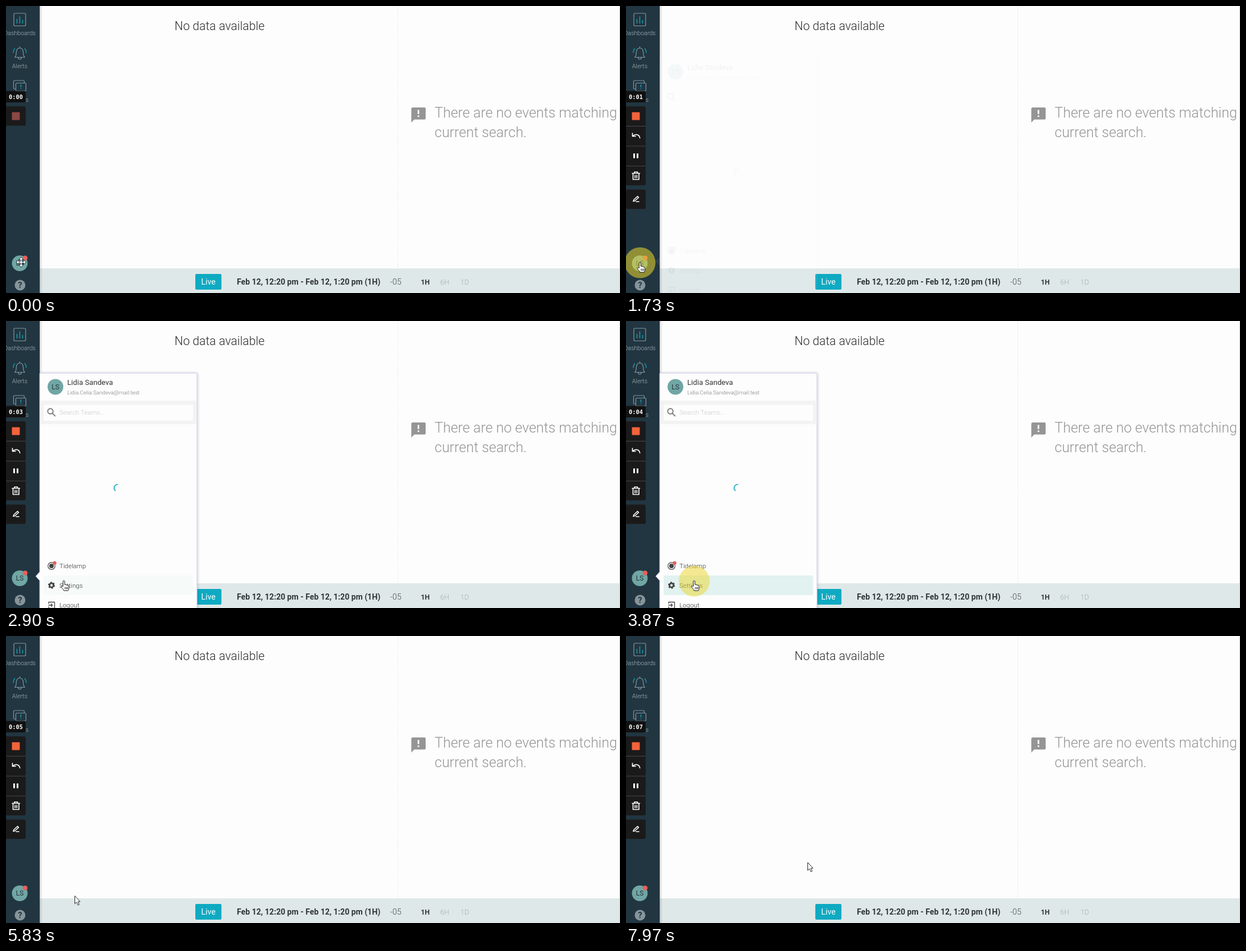
An HTML page that plays this animation: 1093x512 px, repeating every 8000 ms.

```html
<!DOCTYPE html>
<html lang="en">
<head>
<meta charset="utf-8">
<title>Event console</title>
<style>
html, body { margin: 0; width: 100%; height: 100%; overflow: hidden; background: #fdfdfd; }
svg { display: block; }
text { font-family: Roboto, sans-serif; font-weight: 300; }
.mid { text-anchor: middle; }
.reg { font-weight: 400; }
.bold { font-weight: 700; }
.line { fill: none; stroke-linecap: round; stroke-linejoin: round; }
.nav text { font-size: 10.7px; fill: #a9b6bb; text-anchor: middle; }
.nav .line { stroke: #8299a3; stroke-width: 1.2; }
.nav .teal { stroke: #159aa6; stroke-width: 1.6; }
.menu text { font-size: 11.6px; fill: #333; }
.clock text { font: 700 10.4px "DejaVu Sans Mono", monospace; fill: #fff; text-anchor: middle; }

/* One loop is 8 s, so 1% is 80 ms. */
.anim { animation: 8s linear infinite; }
.clock { animation-name: tick; animation-timing-function: step-end; }
.tools { animation-name: tools; }
.stop { animation-name: stop; }
.popup { animation-name: popup; }
.hover { animation-name: hover; }
.pointer { animation-name: travel; }
.glow { animation-name: click; }
.move, .hand, .arrow { animation-timing-function: step-end; }
.move { animation-name: move; }
.hand { animation-name: hand; }
.arrow { animation-name: arrow; }

@keyframes tick {
  0% { transform: translateY(0); }
  8.75% { transform: translateY(-30px); }
  23.4% { transform: translateY(-60px); }
  34.6% { transform: translateY(-90px); }
  47.5% { transform: translateY(-120px); }
  62.5% { transform: translateY(-150px); }
  73.75% { transform: translateY(-180px); }
  86.25%, 100% { transform: translateY(-210px); }
}
@keyframes tools {
  0%, .4% { opacity: 0; }
  4.2%, 100% { opacity: 1; }
}
@keyframes stop {
  0%, .4% { fill: #8c4843; }
  4.2%, 100% { fill: #f2633b; }
}
@keyframes popup {
  0%, 21.5% { opacity: 0; }
  23.75%, 50.6% { opacity: 1; }
  52.5%, 100% { opacity: 0; }
}
@keyframes hover {
  0%, 35.8% { opacity: 0; }
  37.5%, 100% { opacity: 1; }
}
@keyframes travel {
  0%, 33.75% { transform: translate(25px, 458px); animation-timing-function: ease-in; }
  36.25% { transform: translate(103px, 464px); animation-timing-function: ease-out; }
  38.75%, 53.1% { transform: translate(121.5px, 464px); }
  53.2%, 80.375% { transform: translate(122px, 463.5px); animation-timing-function: ease-in; }
  82.875% { transform: translate(140px, 461px); animation-timing-function: cubic-bezier(.35, .3, .65, 1); }
  90.375% { transform: translate(307px, 403.5px); }
  91.25%, 100% { transform: translate(323px, 404px); }
}
@keyframes click {
  0%, 20% { opacity: 0; }
  20.6%, 22% { opacity: .56; }
  25%, 47.2% { opacity: 0; }
  47.8%, 48.8% { opacity: .52; }
  51%, 100% { opacity: 0; }
}
@keyframes move {
  0% { opacity: 1; }
  8.75%, 100% { opacity: 0; }
}
@keyframes hand {
  0% { opacity: 0; }
  8.75% { opacity: 1; }
  34.6% { opacity: 0; }
  35.8% { opacity: 1; }
  52.5%, 100% { opacity: 0; }
}
@keyframes arrow {
  0% { opacity: 0; }
  34.6% { opacity: 1; }
  35.8% { opacity: 0; }
  52.5%, 100% { opacity: 1; }
}
</style>
</head>
<body>
<svg width="1093" height="512" viewBox="0 0 1093 512">
  <defs>
    <linearGradient id="edge">
      <stop offset="0" stop-color="#000" stop-opacity=".16"/>
      <stop offset="1" stop-color="#000" stop-opacity="0"/>
    </linearGradient>
    <filter id="shade" x="-10%" y="-10%" width="120%" height="120%">
      <feDropShadow dx="0" dy="1" stdDeviation="2.5" flood-color="#334" flood-opacity=".3"/>
    </filter>
    <clipPath id="slot"><rect y="152" width="35" height="20"/></clipPath>
    <g id="badge">
      <circle r="14" fill="#70a6a4"/>
      <text class="mid reg" y="4.3" font-size="12" fill="#26363f">LS</text>
    </g>
  </defs>

  <!-- Page -->
  <rect width="1093" height="512" fill="#fdfdfd"/>
  <path d="M697.5 0V468" stroke="#e4e6ee" stroke-dasharray="2 2"/>
  <text x="300" y="43.3" font-size="21.3" fill="#2d2d2d">No data available</text>
  <path d="M724 181h21q2 0 2 2v17.500q0 2-2 2h-18.500L721.500 208V183.500q0-2.500 2.500-2.500z" fill="#959595"/>
  <path d="M734.200 185.500v7.200M734.200 195.300v2.800" stroke="#fdfdfd" stroke-width="2.800"/>
  <g font-size="25" fill="#959595">
    <text x="763" y="199.300">There are no events matching</text>
    <text x="763" y="234.300">current search.</text>
  </g>

  <!-- Time bar -->
  <rect x="60" y="468" width="1033" height="44" fill="#dfe8e8"/>
  <rect x="337" y="478" width="46.500" height="28" rx="2" fill="#0faac2"/>
  <text class="mid reg" x="360.300" y="497.300" font-size="14.200" fill="#fff">Live</text>
  <text class="bold" x="411" y="497.200" font-size="14.100" fill="#2f3538">Feb 12, 12:20 pm - Feb 12, 1:20 pm (1H)</text>
  <text x="684" y="497.200" font-size="14.200" fill="#444c50">-05</text>
  <text class="bold" x="738.500" y="496.800" font-size="12.300" fill="#2f3538">1H</text>
  <g class="reg" font-size="12.500" fill="#a3adb0">
    <text x="773" y="496.800">6H</text>
    <text x="809" y="496.800">1D</text>
  </g>
  <path d="M1092.500 0V512" stroke="#cfd3d4"/>

  <!-- Navigation -->
  <rect x="60" width="5" height="512" fill="url(#edge)"/>
  <rect width="60" height="512" fill="#213641"/>
  <g class="nav">
    <rect class="line" x="14" y="13" width="21" height="22.500" rx="2"/>
    <path class="line teal" stroke-width="2" d="M19.500 30.500v-7M24.500 30.500V19M29.500 30.500v-5"/>
    <text x="24.500" y="52">Dashboards</text>
    <path class="line" d="M15.500 91.500c3-2 2.500-5 2.800-9 .4-5 3-7.500 6.200-7.500s5.800 2.500 6.200 7.500c.3 4-.2 7 2.800 9zM24.500 75v-2.500M21.500 92c.5 4 5.500 4 6 0"/>
    <path class="line teal" d="M15.500 76q-2.500 3-2.500 7M33.500 76q2.500 3 2.500 7"/>
    <text x="24.500" y="111.300">Alerts</text>
    <path class="line" d="M17 148h-2q-1.500 0-1.500-1.500v-12q0-1.500 1.500-1.500h16q1.500 0 1.500 1.500v2.500"/>
    <rect class="line" x="17.500" y="137.500" width="18" height="14" rx="1.500"/>
    <path class="line teal" d="M26.500 140.500v4M26.500 147.500v.3"/>
    <text x="24.500" y="171">Events</text>
  </g>
  <use href="#badge" x="24.500" y="459"/>
  <circle cx="34" cy="449.500" r="4.300" fill="#e8605b"/>
  <circle cx="25" cy="498" r="9.500" fill="#87959b"/>
  <text class="mid bold" x="25" y="503.300" font-size="15" fill="#213641">?</text>

  <!-- Account menu -->
  <g class="anim popup menu">
    <path d="M60 93H340V520H60V463L53 455.300 60 447.500z" fill="#fdfdfd" stroke="#c9c8e4" filter="url(#shade)"/>
    <use href="#badge" x="88" y="117.500"/>
    <text class="reg" x="109" y="114" style="font-size:13.200px">Lidia Sandeva</text>
    <text x="109" y="131" style="font-size:9.800px;fill:#777">Lidia.Celia.Sandeva@mail.test</text>
    <rect x="60.500" y="142" width="279" height="42" fill="#f3f3f3"/>
    <rect x="67" y="149.500" width="266" height="28.500" rx="2" fill="#fdfdfd"/>
    <g class="line" stroke="#777" stroke-width="1.900">
      <circle cx="79" cy="161" r="4.700"/>
      <path d="M82.800 164.800l4.500 4.500"/>
    </g>
    <text x="95" y="167" style="fill:#c9c9c9">Search Teams...</text>
    <path class="line" d="M194.500 302.700A6.500 6.500 0 0 1 199 291.500" stroke="#1aa7bd" stroke-width="1.700"/>

    <rect class="anim hover" x="67" y="454" width="266" height="35" fill="#e1f2f0"/>
    <g fill="none" stroke="#444">
      <circle cx="81" cy="437" r="6.300" stroke-width="1.200"/>
      <circle cx="81" cy="437" r="3.200" fill="#444" stroke-width="1.600"/>
      <circle cx="81" cy="471.500" r="3.600" stroke-width="2.800"/>
      <circle cx="81" cy="471.500" r="5.300" stroke-width="1.800" stroke-dasharray="2.775"/>
      <path class="line" d="M76 504v-2.500h10.500v11H76V510M76 507h6.500M80.500 504.800l2.200 2.200-2.200 2.200" stroke-width="1.300"/>
    </g>
    <circle cx="86.500" cy="431.800" r="3.300" fill="#e8605b"/>
    <text x="95" y="440.600">Tidelamp</text>
    <text x="95" y="475.600">Settings</text>
    <text x="95" y="510.600">Logout</text>
  </g>

  <!-- Recorder -->
  <path d="M0 151.500h32q3 0 3 3v14.500q0 3-3 3H0z" fill="#111"/>
  <g clip-path="url(#slot)">
    <g class="anim clock">
      <text x="17.500" y="165.500">0:00</text>
      <text x="17.500" y="195.500">0:01</text>
      <text x="17.500" y="225.500">0:02</text>
      <text x="17.500" y="255.500">0:03</text>
      <text x="17.500" y="285.500">0:04</text>
      <text x="17.500" y="315.500">0:05</text>
      <text x="17.500" y="345.500">0:06</text>
      <text x="17.500" y="375.500">0:07</text>
    </g>
  </g>
  <path d="M0 179h32q3 0 3 3v31.500H0z" fill="#1b1a1b"/>
  <rect class="anim stop" x="10.500" y="189.500" width="14" height="14" rx="1"/>
  <g class="anim tools">
    <path d="M0 213.500h35V317q0 3-3 3H0zM0 327.500h32q3 0 3 3V359q0 3-3 3H0z" fill="#1b1a1b"/>
    <path d="M0 214.500h35M0 250h35M0 285.500h35" stroke="#454548"/>
    <g class="line" stroke="#fff" stroke-width="1.700">
      <path d="M11.500 227v5.500h5.500M12 232q6-4.500 10.500-1 2 1.700 2.200 4.500"/>
      <path d="M14.500 263v8.500M20.500 263v8.500" stroke-width="3" stroke-linecap="butt"/>
      <path d="M11 298.500h13.500M15 298v-2h5.500v2M12.500 299v10.500h10.500V299M16.200 302v4.500M19.300 302v4.500"/>
      <path d="M13 348.500l1-3 6.500-6 2 2-6.500 6zM18 349h5"/>
    </g>
  </g>

  <!-- Pointer -->
  <g class="anim pointer">
    <circle class="anim glow" r="27.500" fill="#ecd62f"/>
    <g class="anim move">
      <path d="M2-10l4 4.500H3.300V-2.300H6.500V-5l4.500 4-4.500 4V.300H3.300V3.500H6L2 8-2 3.500H.700V.300H-2.500V3L-7-1l4.500-4v2.700H.700V-5.500H-2z" fill="#fff" stroke="#1c2a30" stroke-width="1"/>
    </g>
    <path class="anim hand line" d="M-1.700 9V1q0-1.700 1.500-1.700T1.300 1v5.300q2-.9 2.700.7 1.800-.7 2.500.9 2.300-.5 2.300 1.600v2.700q0 2.500-1.500 4.800H-.200q-1-2.500-3-4.300-1.500-1.800-2-3.200 .5-2 2.200-.5zM2 11v3M4.300 11v3M6.500 11v3" style="fill:#fff" stroke="#111" stroke-width="1"/>
    <path class="anim arrow" d="M.500 0V14.200L3.700 11.200 6 16.600 8.400 15.600 6.100 10.300H10z" fill="#fff" stroke="#222" stroke-width="1" stroke-linejoin="round"/>
  </g>
</svg>
</body>
</html>
```
